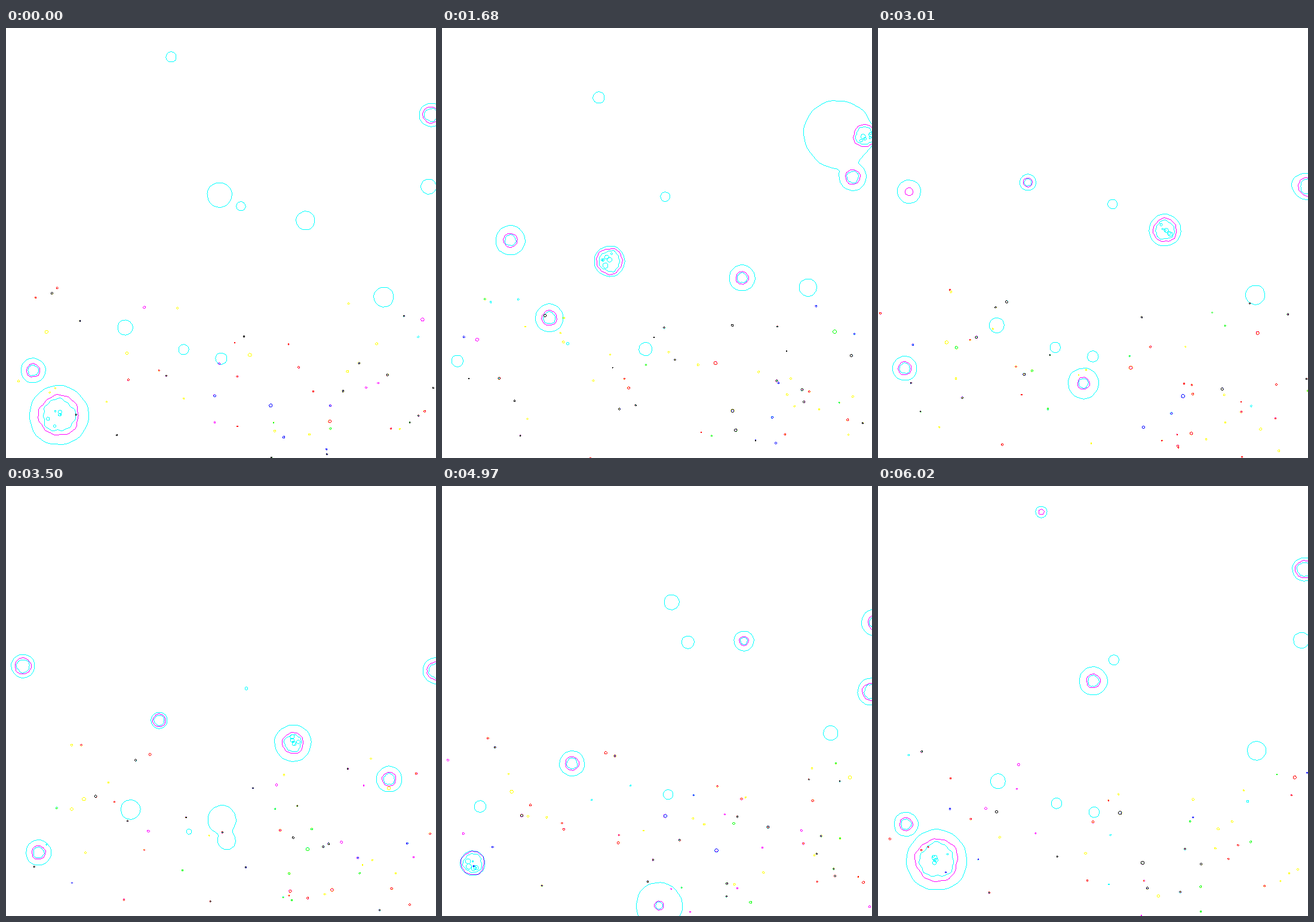
Write an HTML page with a canvas that moves like this. It is 720 by 720 pixels and loops after 6090 ms.

```html
<!DOCTYPE html>
<html lang="en">
<head>
<meta charset="utf-8">
<title>Drifting contours</title>
<style>
html, body { margin: 0; width: 100%; height: 100%; overflow: hidden; background: #fff; }
canvas { display: block; width: 720px; height: 720px; image-rendering: pixelated; }
</style>
</head>
<body>
<canvas id="stage" width="720" height="720"></canvas>
<script>
const SIZE = 720, STEP_MS = 70, STEPS = 87, DOTS = 72, TAU = 2 * Math.PI;
const RED = 0, GREEN = 1, BLUE = 2; // darkened channel: cyan, magenta, yellow line
const SOFT = 4;                     // how softly neighbouring bubbles merge
const ctx = document.getElementById('stage').getContext('2d');
const image = ctx.createImageData(SIZE, SIZE);
const px = image.data;
const field = new Float32Array(SIZE * SIZE);

// Steps at which every travelling bubble has a key.
const KEYS = [0, 11, 24, 36, 50, 71, 86];

// Travelling bubbles; each key: x, y, outer radius, core radius if any.
const PATHS = [
  [[711,145,20,14], [706,205,25,17], [707,180,20,19], [718,221,23,16],
   [720,309,22,16], [718,344,23,15], [713,139,20,15]],
  [[88,648,50,34], [127,536,21], [114,355,25,12], [75,246,20],
   [28,301,20,14], [51,631,21,20], [98,626,51,36]],
  [[357,279,21], [346,603,10,8], [280,390,26,22], [326,631,28,21],
   [361,558,24], [363,702,39,8], [360,326,24,12]],
  [[276,48,9], [265,14,24], [262,116,10], [245,124,14,5],
   [256,392,14,11], [384,194,13], [273,43,10,5]],
  [[501,322,16], [518,608,22,15], [502,418,22,11], [480,246,23,22],
   [480,430,31,18], [505,259,17,8], [503,300,0]]
];

// Bubbles that bob about one place: x, y, radius.
const BOBBERS = [
  [632,450,17], [45,573,21], [297,538,9], [393,298,8],
  [707,265,13], [199,501,13], [360,553,10]
];

// Colour mixes for the dots with their cumulative odds.
const MIXES = [
  [.26, [BLUE]], [.5, [RED, GREEN, BLUE]], [.72, [GREEN, BLUE]],
  [.82, [RED, BLUE]], [.9, [RED, GREEN]], [.96, [GREEN]], [1, [RED]]
];

const hash = (a, b) => {
  const v = Math.sin(a * 127.1 + b * 311.7) * 43758.5453;
  return v - Math.floor(v);
};

const mark = (ch, x, y) => { px[(y * SIZE + x) * 4 + ch] = 0; };

// Pixel span around a centre, kept on the stage.
const span = (c, reach) =>
  [Math.max(0, Math.floor(c - reach)), Math.min(SIZE - 1, Math.ceil(c + reach))];

function ring(ch, cx, cy, r) {
  const inside = (x, y) => Math.hypot(x - cx, y - cy) < r;
  const [x0, x1] = span(cx, r), [y0, y1] = span(cy, r);
  for (let y = y0; y <= y1; y++)
    for (let x = x0; x <= x1; x++)
      if (inside(x, y) && !(inside(x - 1, y) && inside(x + 1, y) && inside(x, y - 1) && inside(x, y + 1)))
        mark(ch, x, y);
}

function addBlob(cx, cy, r, rough, seed) {
  const reach = r * (1 + 3 * rough) + 16;
  const [x0, x1] = span(cx, reach), [y0, y1] = span(cy, reach);
  const p = hash(seed, 1) * TAU, q = hash(seed, 2) * TAU;
  for (let y = y0; y <= y1; y++)
    for (let x = x0; x <= x1; x++) {
      const a = Math.atan2(y - cy, x - cx);
      const wave = Math.sin(3 * a + p) + .7 * Math.sin(5 * a + q) + .6 * Math.sin(11 * a - p);
      const edge = r * (1 + rough * wave);
      field[y * SIZE + x] += Math.exp((edge - Math.hypot(x - cx, y - cy)) / SOFT);
    }
}

// Outlines the merged bubbles of one layer.
function outline(ch, bubbles, layer, rough, step) {
  field.fill(0);
  bubbles.forEach((b, i) => {
    if (b[layer] > 1.5) addBlob(b.x, b.y, b[layer], rough, i * 9 + step + layer.length * 50);
  });
  for (let y = 0; y < SIZE; y++)
    for (let x = 0; x < SIZE; x++) {
      const i = y * SIZE + x;
      if (field[i] < 1) continue;
      if ((x > 0 && field[i - 1] < 1) || (x < SIZE - 1 && field[i + 1] < 1) ||
          (y > 0 && field[i - SIZE] < 1) || (y < SIZE - 1 && field[i + SIZE] < 1)) mark(ch, x, y);
    }
}

const bubble = (x, y, outer, core = 0) =>
  ({ x, y, outer, core, inner: core > 7 ? core * .8 : 0 });

function travel(path, step) {
  let k = KEYS.length - 1;
  while (KEYS[k] > step) k--;
  const next = (k + 1) % KEYS.length;
  const u = (step - KEYS[k]) / ((KEYS[next] || STEPS) - KEYS[k]);
  const mix = i => (path[k][i] || 0) * (1 - u) + (path[next][i] || 0) * u;
  return bubble(mix(0), mix(1), mix(2), mix(3));
}

function bob([x, y, r], i, step) {
  const turn = TAU * step / STEPS;
  const swell = Math.sin(turn * 2 + i) - Math.sin(i);
  const size = Math.max(0, r + 6 * swell);
  return bubble(x - 20 * Math.sin(turn), y + 50 * Math.sin(turn * 2), size,
    size > 18 ? size * .55 : 0);
}

function burst(step) {
  const d = step - 24;
  return bubble(662, 177 - 4 * d, 57 * Math.max(0, 1 - d * d / 64));
}

// Flecks inside the widest bubbles.
function flecks(b, seed) {
  if (b.inner < 13) return;
  for (let i = 0; i < 6; i++) {
    const a = hash(seed, i) * TAU, d = b.inner * .75 * hash(seed, i + 20);
    ring(RED, b.x + d * Math.cos(a), b.y + d * Math.sin(a), 1.5 + 3.5 * hash(seed, i + 40));
  }
}

// Upper edge of the dotted ground.
const ground = x => x < 360 ? 390 + .31 * x : 500 - .12 * (x - 360);

function drawDot(i, step) {
  if (hash(i, 60 + (step >> 3)) < .15) return;
  const turn = TAU * step / STEPS * (hash(i, 3) < .5 ? 1 : -1);
  const homeX = SIZE * Math.pow(hash(i, 1), .72);
  const top = ground(homeX);
  const homeY = top + (SIZE - top) * hash(i, 2);
  const x = homeX + (25 + 40 * hash(i, 5)) * Math.sin(turn + hash(i, 4) * TAU);
  const y = homeY + (8 + 14 * hash(i, 7)) * Math.sin(turn + hash(i, 6) * TAU);
  const pick = hash(i, step + 100);
  const mix = MIXES.find(m => pick < m[0])[1];
  const r = 1.5 + .9 * hash(i, 8) + (hash(i, 9) > .88 ? 1 : 0);
  for (const ch of mix)
    ring(ch, x, y, r - (mix.length > 1 ? .5 * hash(i + ch, step) : .2));
}

function draw(step) {
  px.fill(255);
  const bubbles = [
    ...PATHS.map(p => travel(p, step)),
    ...BOBBERS.map((b, i) => bob(b, i, step)),
    burst(step)
  ];
  outline(RED, bubbles, 'outer', .012, step);
  outline(GREEN, bubbles, 'core', .03, step);
  outline(RED, bubbles, 'inner', .05, step);
  bubbles.forEach((b, i) => flecks(b, i * 31 + step));
  for (let i = 0; i < DOTS; i++) drawDot(i, step);
  ctx.putImageData(image, 0, 0);
}

let shown = -1;
function tick() {
  const step = Math.floor(performance.now() / STEP_MS) % STEPS;
  if (step !== shown) draw(shown = step);
  requestAnimationFrame(tick);
}
tick();
</script>
</body>
</html>
```
